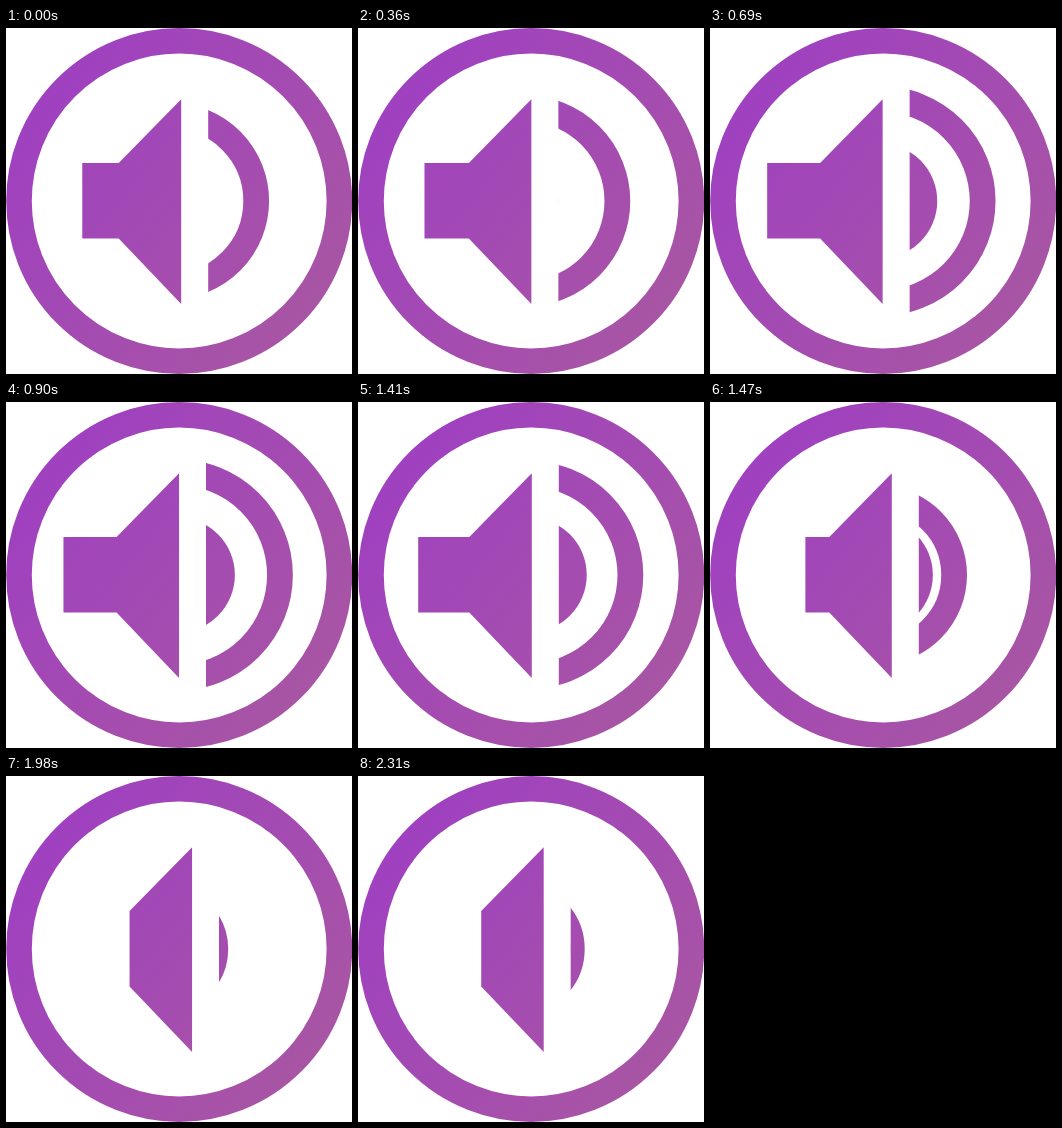
These frames come from a looping animation (346x346 px, 2.44 s). An HTML page:

```html
<!DOCTYPE html>
<html lang="en">
<head>
<meta charset="utf-8">
<title>Volume icon</title>
<style>
  html, body { margin: 0; width: 100%; height: 100%; overflow: hidden; background: #fff; }
  svg { display: block; width: 100vw; height: 100vh; }
</style>
</head>
<body>
<svg viewBox="0 0 346 346">
  <defs>
    <linearGradient id="tint" gradientUnits="userSpaceOnUse" x1="30" y1="60" x2="310" y2="280">
      <stop offset="0" stop-color="#9f40c1"/>
      <stop offset="1" stop-color="#a855a4"/>
    </linearGradient>
    <clipPath id="rightSide"><rect id="clipBox" y="0" width="346" height="346"/></clipPath>
  </defs>
  <circle cx="173.2" cy="173" r="160.2" fill="none" stroke="url(#tint)" stroke-width="25.6"/>
  <path id="speaker" fill="url(#tint)"/>
  <g clip-path="url(#rightSide)">
    <circle id="wave" cy="173" fill="none" stroke="url(#tint)" stroke-width="25.8"/>
    <circle id="disc" cy="173" r="57.6" fill="url(#tint)"/>
  </g>
</svg>
<script>
const LOOP = 2440, STEP = 30, DURATION = 900;
const OPEN_START = 206, CLOSE_START = 1407, FIRST_MOVE = 330;
const WAVE_GAP = 27;

const $ = id => document.getElementById(id);
const clamp = v => Math.min(1, Math.max(0, v));
const mix = (a, b, p) => a + (b - a) * p;
const set = (id, attrs) => {
  for (const key in attrs) $(id).setAttribute(key, attrs[key]);
};

function bezier(x1, y1, x2, y2) {
  const curve = (a, b, s) => 3 * a * s * (1 - s) ** 2 + 3 * b * s * s * (1 - s) + s ** 3;
  return x => {
    if (x <= 0) return 0;
    if (x >= 1) return 1;
    let low = 0, high = 1;
    for (let i = 0; i < 30; i++) {
      const mid = (low + high) / 2;
      if (curve(x1, x2, mid) < x) low = mid; else high = mid;
    }
    return curve(y1, y2, low);
  };
}

const easeShift = bezier(.1, 1.45, .2, 1);
const easeBack = bezier(.1, 1.1, .2, 1);
const easeOut = bezier(.1, 1, .2, 1);
const easeSettle = bezier(.1, 1, .2, 1.2);
const easeLate = bezier(.3, 1, .2, 1);

function render(time) {
  const t = Math.floor(time / STEP) * STEP;
  const closing = t >= CLOSE_START;
  const elapsed = closing ? t - CLOSE_START : Math.max(t, FIRST_MOVE - STEP) - OPEN_START;
  const x = clamp(elapsed / DURATION);
  const openness = p => closing ? 1 - p : p;

  const shift = openness(easeShift(x));
  const back = openness(easeBack(x));
  const wave = openness(closing ? easeSettle(x) : easeOut(x));
  const disc = openness(closing ? easeOut(x) : easeLate(clamp((elapsed - 170) / 730)));

  // Everything hangs on the flat right edge of the cone.
  const edge = mix(185.7, 173.2, shift);
  const neck = edge - 62.5;
  const left = Math.min(neck, edge - mix(62.5, 115.5, back));

  set('speaker', {
    d: `M${left} 135H${neck}L${edge} 71.3V276L${neck} 210.5H${left}Z`
  });
  set('clipBox', { x: edge + WAVE_GAP });
  set('wave', { cx: edge + mix(-26, -1.7, wave), r: mix(67, 115.6, wave) - 12.9 });
  set('disc', { cx: edge + mix(-30.8, -1.7, disc) });
}

const start = performance.now();
function tick() {
  render((performance.now() - start) % LOOP);
  requestAnimationFrame(tick);
}
tick();
</script>
</body>
</html>
```
